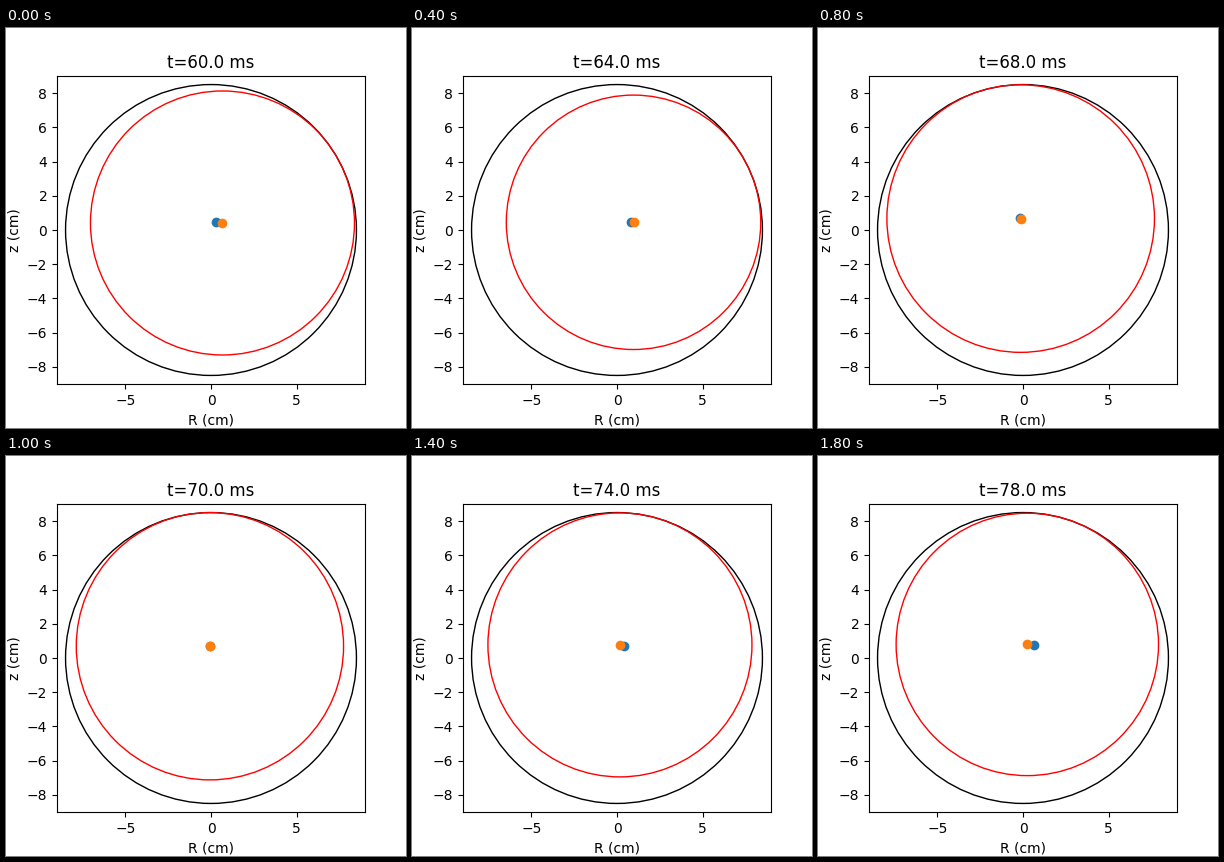
These frames come from a looping animation (400x400 px, 1900 ms). A matplotlib script:

```python
import math

import matplotlib.pyplot as plt
from matplotlib.animation import FuncAnimation

WALL = 8.5      # limiter radius, cm
FRAMES = 19
START = 60      # ms
JUMP = 65       # ms, when the plasma is thrown to the other side


def swing(t, middle, width):
    return math.tanh((t - middle) / width)


def kick(t):
    """Displacement left over from the jump, fading by a third each ms."""
    return 3.0 ** (JUMP - t)


def plasma_centre(t):
    if t < JUMP:
        return 0.67 + 0.074 * (t - START), 0.41 + 0.01 * (t - START)
    s, k = swing(t, 72.1, 3), kick(t)
    return 0.06 + 0.2 * s - 0.54 * k, 0.728 + 0.068 * s - 0.2 * k**2


def blue_centre(t):
    if t < JUMP:
        return 0.32 + 0.125 * (t - START), 0.44
    s, k = swing(t, 72.7, 3.5), kick(t)
    return 0.232 + 0.45 * s - 0.54 * k, 0.662 + 0.0065 * (t - JUMP) - 0.2 * k**2


fig, ax = plt.subplots(figsize=(4, 4), dpi=100)
ax.set(xlim=(-9, 9), ylim=(-9, 9), aspect="equal",
       xticks=range(-5, 6, 5), yticks=range(-8, 9, 2),
       xlabel="R (cm)", ylabel="z (cm)")
title = ax.set_title("")

ax.add_patch(plt.Circle((0, 0), WALL, fill=False, color="black"))
plasma = ax.add_patch(plt.Circle((0, 0), WALL, fill=False, color="red"))
blue_dot, = ax.plot([], [], "o", color="tab:blue")
orange_dot, = ax.plot([], [], "o", color="tab:orange")


def place(dot, point):
    dot.set_data([point[0]], [point[1]])


def update(i):
    t = START + i
    centre = plasma_centre(t)
    place(blue_dot, blue_centre(t))
    place(orange_dot, centre)
    # The plasma edge always touches the limiter.
    plasma.set_center(centre)
    plasma.set_radius(WALL - math.hypot(*centre))
    title.set_text(f"t={t:.1f} ms")
    return plasma, blue_dot, orange_dot, title


anim = FuncAnimation(fig, update, frames=FRAMES, interval=100, repeat=True)
plt.show()
```
